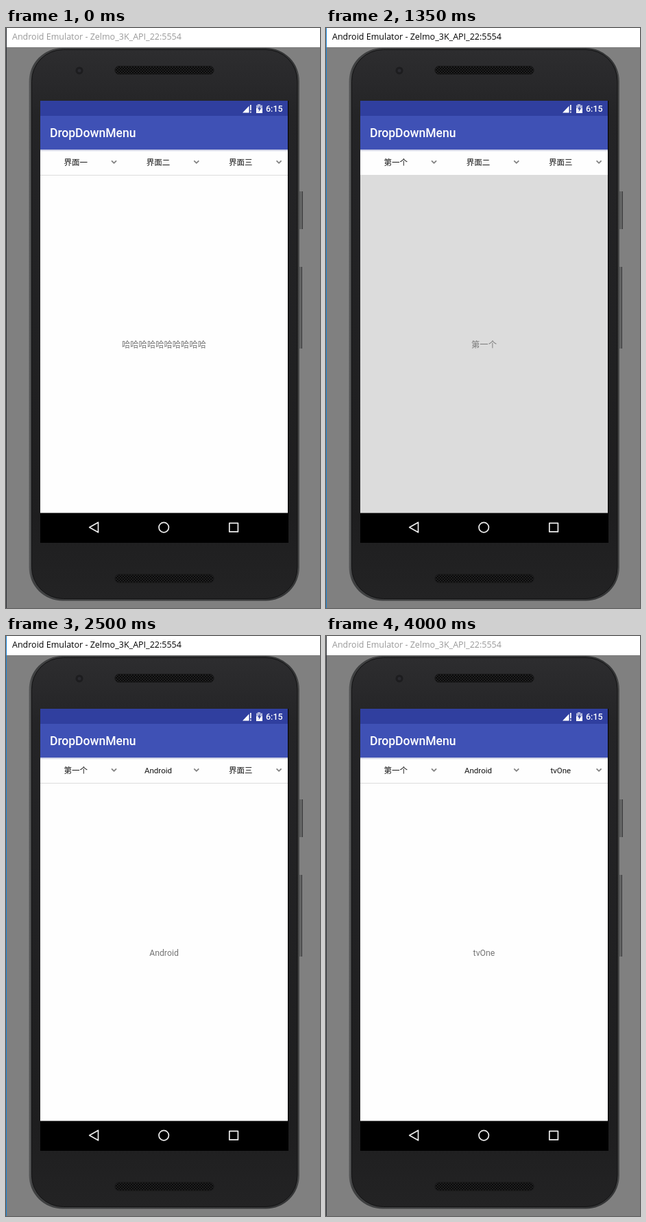
Recreate the animation shown at these times as an HTML page. Size 458 by 845 pixels, loop 4050 ms.

```html
<!DOCTYPE html>
<html lang="zh-CN">
<head>
<meta charset="utf-8">
<title>DropDownMenu</title>
<style>
  html, body { margin: 0; width: 100%; height: 100%; overflow: hidden; background: #808080; }
  svg { display: block; width: 100%; height: 100%; }
  text { font-family: Roboto, 'Noto Sans CJK SC', 'Noto Sans CJK', sans-serif; }
  .mid { text-anchor: middle; }
  .body { font-size: 12.3px; fill: #757575; }
  .button { font-size: 13.8px; fill: #fff; }
  .line { fill: none; stroke: #eee; stroke-width: 1.7; stroke-linejoin: round; }
</style>
</head>
<body>
<svg viewBox="0 0 458 845">
  <defs>
    <linearGradient id="rim">
      <stop offset="0" stop-color="#5c5d5e"/><stop offset=".012" stop-color="#3f4041"/>
      <stop offset=".985" stop-color="#343536"/><stop offset="1" stop-color="#4c4d4d"/>
    </linearGradient>
    <linearGradient id="shell" x1="0" y1="0" x2="0" y2="1">
      <stop offset="0" stop-color="#2d2d2f"/><stop offset=".12" stop-color="#242426"/>
      <stop offset=".85" stop-color="#1e1e1f"/><stop offset="1" stop-color="#232324"/>
    </linearGradient>
    <linearGradient id="shade" x1="0" y1="0" x2="0" y2="1">
      <stop offset="0" stop-color="#b4b9d8"/><stop offset="1" stop-color="#fefefe"/>
    </linearGradient>
    <pattern id="mesh" width="4" height="4" patternUnits="userSpaceOnUse">
      <path d="M0 0h2v2h-2zM2 2h2v2h-2z" fill="#0a0a0a"/>
    </pattern>
    <clipPath id="area"><path d="M50 215H411V706.500H50z"/></clipPath>
  </defs>

  <!-- window -->
  <path d="M0 0H458V845H0z" fill="#808080"/>
  <path d="M0 0H458V28H0z" fill="#fff"/>
  <path id="edge" d="M0 0H1V845H0z"/>
  <text id="title" x="9" y="17" style="font:12.5px 'Open Sans','Noto Sans',sans-serif">Android Emulator - Zelmo_3K_API_22:5554</text>

  <!-- phone -->
  <path d="M428 238h5v55h-5zM428 348h4v119h-4z" fill="#626363"/>
  <path d="M432 238h1v55h-1zM431 348h1v119h-1z" fill="#3a3a3b"/>
  <rect x="33.500" y="29" width="394.500" height="805.500" rx="49" fill="url(#rim)"/>
  <rect x="37.500" y="31.500" width="387.500" height="800" rx="46" fill="url(#shell)" stroke="#121213"/>
  <circle cx="107" cy="62" r="5.500" fill="#1d1d1f"/>
  <circle cx="107" cy="62" r="2.500" fill="#2b2b30"/>
  <g id="grilles"></g>

  <!-- screen -->
  <path d="M50 106H412V750H50z"/>
  <path d="M50 106H411V128H50z" fill="#303f9f"/>
  <path d="M50 128H411V177H50z" fill="#3f51b5"/>
  <path d="M50 177H411V706.500H50z" fill="#fefefe"/>
  <path d="M50 177H411V180H50z" fill="url(#shade)"/>
  <path d="M50 214H411V215H50z" fill="#dcdcdc"/>
  <path d="M345 123.500L354.500 113.500V123.500zM356 112h1.700v8h-1.700zM356 121.500h1.700v2h-1.700z" fill="#fff"/>
  <path d="M367 111h4v1.500h3v11.500h-9v-11.500h2z" fill="#aeb5dc"/>
  <path d="M365 117h9v7h-9z" fill="#fff"/>
  <path d="M370.500 113l-3.500 5.500h2.200l-.7 4 3.700-5.700h-2.300z" fill="#303f9f"/>
  <text x="379" y="121.700" font-size="12.500" font-weight="500" fill="#fff">6:15</text>
  <text x="64" y="159" font-size="17.500" font-weight="500" fill="#fff">DropDownMenu</text>
  <g id="tabs"></g>

  <g clip-path="url(#area)">
    <text id="content" class="mid body" x="230.500" y="466"></text>
    <path id="mask" d="M50 215H411V707H50z" fill="#888"/>
    <g class="panel">
      <path d="M50 215H411V266H50z" fill="#fefefe"/>
      <path d="M58.600 224h55.800v33h-55.800z" fill="#3f51b5"/>
      <path d="M132 224h56v33h-56z" fill="#9c27b0"/>
      <text class="mid button" x="86.500" y="246">第一个</text>
      <text class="mid button" x="160" y="246">第二个</text>
    </g>
    <g class="panel">
      <path d="M50 215H411V259H50z" fill="#fefefe"/>
      <text class="mid body" x="230.500" y="236">Android</text>
    </g>
    <g class="panel">
      <path d="M50 215H411V341H50z" fill="#fefefe"/>
      <text class="mid body" x="230.500" y="236">TextView_01</text>
      <text class="mid body" x="230.500" y="280">TextView_02</text>
      <text class="mid body" x="230.500" y="324">TextView_03</text>
    </g>
  </g>

  <!-- navigation -->
  <path class="line" d="M121.700 727.500L134.500 720.200V734.800zM325.800 721.300h12.600v12.600h-12.600z"/>
  <circle class="line" cx="230.200" cy="727.600" r="7.200"/>
</svg>
<script>
const LOOP = 4050, STEP = 50, AREA_HEIGHT = 492;
const PURPLE = '#8a1f9f';
const menus = [
  { name: '界面一', pick: '第一个', open: 550, close: 1250, shut: 1450 },
  { name: '界面二', pick: 'Android', open: 1700, close: 2250, shut: 2500 },
  { name: '界面三', pick: 'tvOne', open: 2800, close: 3500, shut: 3700 }
];
const get = id => document.getElementById(id);
const panels = document.querySelectorAll('.panel');

get('grilles').innerHTML = [55.5, 796].map(y => ['#1f1f20', 'url(#mesh)'].map(fill =>
  `<rect x="159" y="${y}" width="144" height="12" rx="6" fill="${fill}" stroke="#1a1a1b"/>`).join('')).join('');

get('tabs').innerHTML = menus.map((m, i) => {
  const x = 101.7 + i * 120.3;
  return `<g><text class="mid" x="${x}" y="199.500" font-size="11.500"></text>
    <path transform="translate(${x + 55.8} 195.300)" fill="none" stroke-width="1.800"/></g>`;
}).join('');
const tabs = [...get('tabs').children];

const ease = p => (1 - Math.cos(Math.PI * Math.min(1, Math.max(0, p)))) / 2;

function shown(m, t) {
  if (t < m.open) return 0;
  if (t < m.close) return ease((t - m.open + 45) / 245);
  return 1 - ease((t - m.close - 10) / (m.shut - m.close - 10));
}

function draw(t) {
  const active = t >= 400 && t < 4000;
  get('title').setAttribute('fill', active ? '#000' : '#999');
  get('edge').setAttribute('fill', active ? '#1883d7' : '#303338');

  let content = '哈'.repeat(10), mask = 0;
  menus.forEach((m, i) => {
    const selected = t >= m.open && t < m.close;
    const picked = t >= m.close;
    const amount = shown(m, t);
    const [label, arrow] = tabs[i].children;
    label.textContent = picked ? m.pick : m.name;
    label.setAttribute('fill', selected ? PURPLE : '#111');
    arrow.setAttribute('d', selected ? 'M-3.500 2L0 -1.500L3.500 2' : 'M-3.500 -2L0 1.500L3.500 -2');
    arrow.setAttribute('stroke', selected ? PURPLE : '#808080');
    panels[i].setAttribute('transform', `translate(0 ${-AREA_HEIGHT * (1 - amount)})`);
    if (picked) content = m.pick;
    mask = Math.max(mask, amount);
  });
  get('content').textContent = content;
  get('mask').setAttribute('opacity', mask * 0.533);
}

function tick() {
  const t = performance.now() % LOOP;
  draw(Math.floor(t / STEP) * STEP);
  requestAnimationFrame(tick);
}
tick();
</script>
</body>
</html>
```
